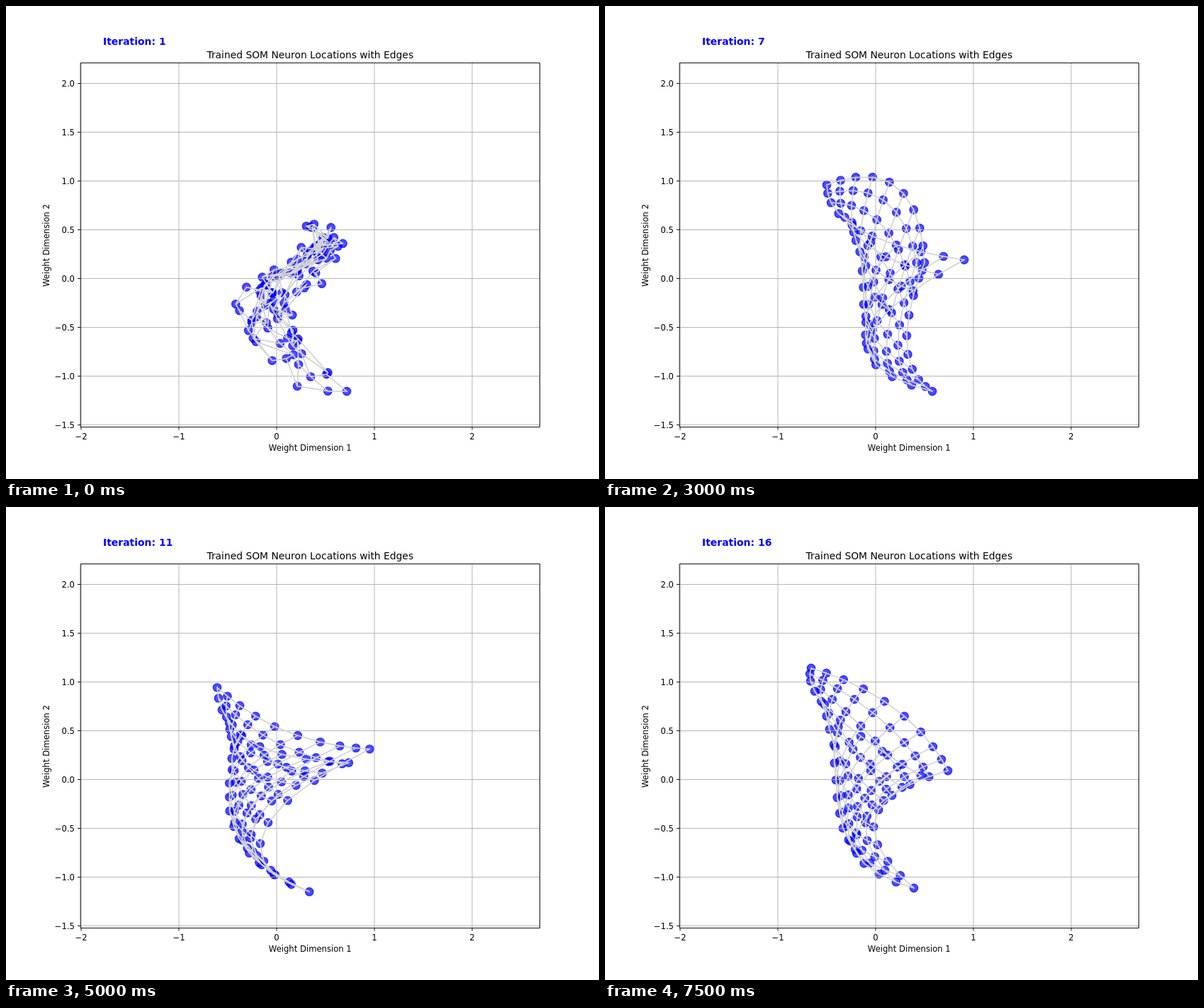
An HTML page for the animation above (8 s loop, 837 by 669 pixels).

```html
<!DOCTYPE html>
<html lang="en">
<head>
<meta charset="utf-8">
<title>Neuron map training</title>
<style>
html, body { margin: 0; width: 100%; height: 100%; overflow: hidden; background: #fff; }
svg { display: block; width: 837px; height: 669px; }
text { font: 11.62px "DejaVu Sans", sans-serif; fill: #000; }
.title { font-size: 13.85px; }
.count { font-size: 13.95px; font-weight: bold; fill: #00f; }
#dots circle { fill: #00f; stroke: #00f; stroke-width: 1.4; fill-opacity: .7; stroke-opacity: .7; }
#grid { stroke: #b0b0b0; stroke-width: .93; fill: none; }
#edges { stroke: #d3d3d3; stroke-width: 1.74; fill: none; stroke-linejoin: round; stroke-linecap: square; }
#axes { stroke: #000; stroke-width: .93; fill: none; }
</style>
</head>
<body>
<svg viewBox="0 0 837 669">
  <g id="dots"></g>
  <path id="grid"/>
  <path id="edges"/>
  <path id="axes"/>
  <g id="labels"></g>
</svg>
<script>
const SVG = 'http://www.w3.org/2000/svg';
const SIZE = 10, STEP_MS = 500, STEPS = 16;
const NODES = Array.from({ length: SIZE * SIZE }, (_, n) => n);
const byId = id => document.getElementById(id);

function add(parent, tag, attrs, content = '') {
  const node = document.createElementNS(SVG, tag);
  for (const name in attrs) node.setAttribute(name, attrs[name]);
  node.textContent = content;
  return parent.appendChild(node);
}

// The map is a bent sheet. Its key points: three edges from corner to corner
// by way of the middle (first row, middle row, last row).
const poses = {
  1: ['434,318 470,330 445,375', '440,335 375,405 410,440', '350,398 362,480 481,545'],
  3: ['399,194 475,281 494,330', '449,300 460,360 425,410', '410,390 347,486 390,526'],
  5: ['276,110 320,244 438,366', '347,290 330,395 346,472', '426,440 385,496 390,530'],
  7: ['313,253 412,256 451,363', '362,318 370,395 426,480', '507,359 372,472 462,545'],
  10: ['297,299 379,350 522,339', '315,350 300,398 375,463', '460,355 328,445 463,549'],
  13: ['300,168 423,252 453,349', '404,295 350,375 337,450', '498,375 384,467 343,514'],
  16: ['291,228 409,285 484,373', '320,290 332,384 381,440', '446,380 352,473 436,539']
};

// Neurons crowd together towards the borders of the map.
const crowd = t => t - .05 * Math.sin(2 * Math.PI * t);

function bend([a, b, c], t) {
  return [0, 1].map(k =>
    a[k] * (1 - t) * (1 - 2 * t) + b[k] * 4 * t * (1 - t) + c[k] * t * (2 * t - 1));
}

function sheet(rows) {
  const net = rows.map(row => row.split(' ').map(p => p.split(',').map(Number)));
  return NODES.map(n => {
    const u = crowd(n % SIZE / (SIZE - 1));
    const v = crowd(Math.floor(n / SIZE) / (SIZE - 1));
    return bend(net.map(row => bend(row, u)), v);
  });
}

function random(seed) {
  const v = Math.sin(seed * 12.9898 + 4.1) * 43758.5453;
  return v - Math.floor(v);
}

const scatter = points => points.map((p, n) => p.map((v, axis) =>
  v + (random(n * 2 + axis) - .5) * 36 * (n < SIZE * SIZE - 1)));

// Between two poses the sheet swings out to the right and downwards.
const swing = (v, pivot, gain) => v > pivot ? pivot + (v - pivot) * gain : v;

const keys = Object.keys(poses).map(Number);
const shapes = {};
keys.forEach(k => shapes[k] = sheet(poses[k]));
shapes[1] = scatter(shapes[1]);
for (let step = 1; step <= STEPS; step++) {
  if (poses[step]) continue;
  const to = keys.find(k => k > step), from = keys[keys.indexOf(to) - 1];
  const mix = (step - from) / (to - from);
  shapes[step] = shapes[from].map((p, n) => {
    const [x, y] = p.map((v, axis) => v + (shapes[to][n][axis] - v) * mix);
    return [swing(x, 380, 1.12), swing(y, 400, 1.05)];
  });
}

function drawChart() {
  const labels = byId('labels');
  let grid = '', axes = 'M105.2 80.5H753.5V595.5H105.2Z';
  const minus = s => s.replace('-', '\u2212');
  for (let v = -2; v <= 2; v++) {
    const x = 382 + 138 * v;
    grid += `M${x} 80V596`;
    axes += `M${x} 595.5v4.1`;
    add(labels, 'text', { x, y: 612.5, 'text-anchor': 'middle' }, minus(String(v)));
  }
  for (let v = -1.5; v <= 2; v += .5) {
    const y = 385.5 - 138 * v;
    grid += `M105 ${y}H754`;
    axes += `M105.2 ${y}h-4.1`;
    add(labels, 'text', { x: 97, y: y + 4.3, 'text-anchor': 'end' }, minus(v.toFixed(1)));
  }
  byId('grid').setAttribute('d', grid);
  byId('axes').setAttribute('d', axes);
  const middle = { 'text-anchor': 'middle' };
  add(labels, 'text', { x: 429.3, y: 74, class: 'title', ...middle }, 'Trained SOM Neuron Locations with Edges');
  add(labels, 'text', { x: 429.3, y: 629, ...middle }, 'Weight Dimension 1');
  add(labels, 'text', { transform: 'translate(61 338.5) rotate(-90)', ...middle }, 'Weight Dimension 2');
  return add(labels, 'text', { x: 137, y: 54.5, class: 'count' });
}

const counter = drawChart();
const dots = NODES.map(() => add(byId('dots'), 'circle', { r: 5.7 }));
let shown = 0;

function render(time) {
  const step = Math.floor(time / STEP_MS) % STEPS + 1;
  if (step === shown) return;
  shown = step;
  const points = shapes[step];
  counter.textContent = 'Iteration: ' + step;
  points.forEach(([x, y], n) => {
    dots[n].setAttribute('cx', x.toFixed(2));
    dots[n].setAttribute('cy', y.toFixed(2));
  });
  const line = pick => 'M' + Array.from({ length: SIZE }, (_, i) =>
    points[pick(i)].map(v => v.toFixed(2)).join(' ')).join('L');
  let path = '';
  for (let k = 0; k < SIZE; k++) path += line(i => k * SIZE + i) + line(i => i * SIZE + k);
  byId('edges').setAttribute('d', path);
}

const start = performance.now();
function tick() {
  render(performance.now() - start);
  requestAnimationFrame(tick);
}
tick();
</script>
</body>
</html>
```
